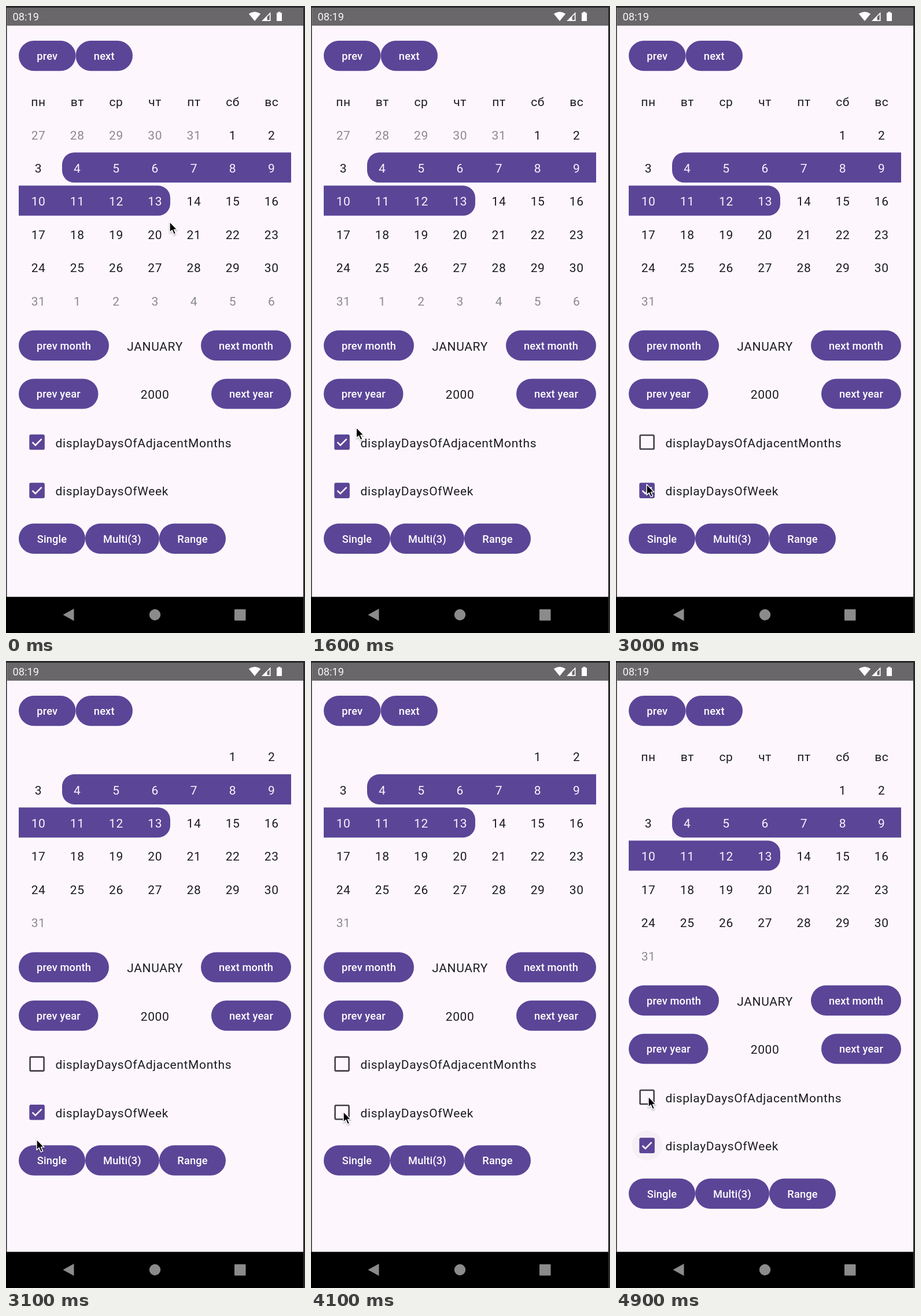
Recreate the animation shown at these times as an HTML page. Size 517 by 1084 pixels, loop 5 s.

```html
<!DOCTYPE html>
<html lang="en">
<head>
<meta charset="utf-8">
<title>Calendar range selection</title>
<style>
  html, body { margin: 0; width: 100%; height: 100%; overflow: hidden; background: #fdf7fd; }
  svg { display: block; width: 517px; height: 1084px; }
  text { font: 400 21px Roboto, "Open Sans", sans-serif; letter-spacing: .65px; fill: #1c1b1f; }
  .mid { text-anchor: middle; }
  .dim { fill: #8d898e; }
  .on { fill: #f8f4fc; }
  .label { font-size: 18.3px; font-weight: 500; letter-spacing: .13px; fill: #fff; }
  .clock { font-size: 18.3px; letter-spacing: 0; fill: #f6f6f6; }
  .fill { fill: #5b4597; }
</style>
</head>
<body>
<svg viewBox="0 0 517 1084">
  <defs>
    <radialGradient id="glow">
      <stop offset=".5" stop-color="#1c1b1f" stop-opacity=".3"/>
      <stop offset="1" stop-color="#1c1b1f" stop-opacity="0"/>
    </radialGradient>
    <filter id="shade" x="-50%" y="-50%" width="200%" height="200%">
      <feDropShadow dx="0" dy="1.5" stdDeviation="1.2" flood-opacity=".35"/>
    </filter>
  </defs>
  <rect width="517" height="1084" fill="#2a282b"/>
  <rect x="1.5" y="3" width="512.5" height="1081" fill="#fdf7fd"/>
  <rect x="1.5" y="3" width="512.5" height="31" fill="#6a676a"/>
  <text class="clock" x="11.5" y="25">08:19</text>
  <g fill="#fff">
    <path d="M419.800 13.500Q430 6.500 440.200 13.500L430 26Z"/>
    <path d="M457.500 10.500V26H442ZM455.800 14.500L451.500 18.800V24.300H455.800Z" fill-rule="evenodd"/>
    <path d="M470.500 10H474.500V11.800H477V26H468V11.800H470.500Z"/>
  </g>

  <g id="top"></g>
  <g id="week"></g>
  <g id="body">
    <path class="fill" d="M493 253.200V305.300H118A21 21 0 0 1 97 284.300V274.200A21 21 0 0 1 118 253.200Z"/>
    <path class="fill" d="M22 310.600H263A21 21 0 0 1 284 331.600V341.600A21 21 0 0 1 263 362.600H22Z"/>
    <g id="adjacent"></g>
    <g id="days"></g>
  </g>

  <rect y="1021.500" width="514" height="62.500"/>
  <g fill="#8b8b8b">
    <path d="M98.500 1052.500L117.500 1042V1063Z"/>
    <circle cx="257.500" cy="1052.500" r="9.700"/>
    <rect x="395" y="1043" width="19.500" height="19.500" rx="1"/>
  </g>
  <path id="cursor" filter="url(#shade)" fill="#000" stroke="#fff" stroke-width="1.400" stroke-linejoin="round"
        d="M0 0V18.500L4.200 14.600L7.300 21.800L10.600 20.400L7.500 13.400H13Z"/>
</svg>
<script>
const $ = id => document.getElementById(id);
const LOOP = 5000, STEP = 100, ROW = 57.4;
const HIDE_ADJACENT = 2000, HIDE_WEEK = 3100, SHOW_WEEK = 4200;

function add(parent, tag, attrs, content) {
  const el = document.createElementNS("http://www.w3.org/2000/svg", tag);
  for (const key in attrs) el.setAttribute(key, attrs[key]);
  if (content) el.textContent = content;
  parent.appendChild(el);
  return el;
}

function button(parent, left, right, top, content) {
  add(parent, "rect", { class: "fill", x: left, y: top, width: right - left, height: 52.2, rx: 26.1 });
  add(parent, "text", { class: "mid label", x: (left + right) / 2, y: top + 33 }, content);
}

function cell(parent, col, row, content, cls = "") {
  add(parent, "text", { class: "mid " + cls, x: 56.1 + 67.2 * col, y: 173.2 + ROW * row }, content);
}

function checkbox(y, content) {
  const g = add($("body"), "g", { transform: `translate(53.6 ${y})` });
  const ripple = add(g, "circle", { r: 26.1 });
  const box = add(g, "rect", { x: -12, y: -12, width: 24, height: 24, rx: 1.6, "stroke-width": 2.6 });
  const tick = add(g, "path", { d: "M-8 .2L-2.800 5.400L8 -5.400", fill: "none", stroke: "#fff", "stroke-width": 2.5 });
  add(g, "text", { x: 31.8, y: 8.5 }, content);
  return { ripple, box, tick };
}

function drawCheckbox(part, checked, age) {
  const early = age >= 100 && age < 200;
  part.box.setAttribute("fill", checked ? "#5b4597" : early ? "rgba(28,27,31,.07)" : "none");
  part.box.setAttribute("stroke", checked ? "#5b4597" : "#443f49");
  part.tick.style.display = checked ? "" : "none";
  part.ripple.setAttribute("fill", early ? "url(#glow)" : "#1c1b1f");
  part.ripple.setAttribute("r", early ? 23 : 26.1);
  part.ripple.setAttribute("opacity", early ? 1 : age >= 200 ? Math.max(0, .12 * (900 - age) / 800) : 0);
}

button($("top"), 22, 120.5, 60, "prev");
button($("top"), 120.5, 219, 60, "next");
["пн", "вт", "ср", "чт", "пт", "сб", "вс"].forEach((name, i) => cell($("week"), i, 0, name));

// The grid begins on 27 December
for (let i = 0; i < 42; i++) {
  const day = i - 4, col = i % 7, row = 1 + Math.floor(i / 7);
  if (day < 1) cell($("adjacent"), col, row, day + 31, "dim");
  else if (day > 31) cell($("adjacent"), col, row, day - 31, "dim");
  else cell($("days"), col, row, day, day === 31 ? "dim" : day > 3 && day < 14 ? "on" : "");
}

const body = $("body");
button(body, 22, 178, 560.8, "prev month");
button(body, 337, 493, 560.8, "next month");
button(body, 22, 159.5, 644.4, "prev year");
button(body, 355, 493, 644.4, "next year");
add(body, "text", { class: "mid", x: 257.6, y: 595.5 }, "JANUARY");
add(body, "text", { class: "mid", x: 257.6, y: 679 }, "2000");
const adjacentBox = checkbox(754, "displayDaysOfAdjacentMonths");
const weekBox = checkbox(837.6, "displayDaysOfWeek");
button(body, 22, 137, 894.7, "Single");
button(body, 137, 265, 894.7, "Multi(3)");
button(body, 265, 380, 894.7, "Range");

// Pointer stops: time, x, y
const path = [
  [0, 283, 373], [100, 283, 373], [300, 205, 312], [500, 100, 268], [600, 97, 265],
  [800, 101, 530], [1000, 106, 680], [1300, 106, 683], [1800, 60, 759], [2500, 60, 759],
  [2900, 53, 827], [3300, 53, 827], [3800, 56, 779], [4400, 56, 779], [4800, 56, 753], [5000, 56, 753]
];

function pointerAt(t) {
  const i = path.findIndex(p => p[0] > t);
  const [t0, x0, y0] = path[i - 1], [t1, x1, y1] = path[i];
  const k = (t - t0) / (t1 - t0);
  return [x0 + (x1 - x0) * k, y0 + (y1 - y0) * k];
}

function draw(t) {
  const compact = t >= HIDE_WEEK && t < SHOW_WEEK;
  $("week").style.display = compact ? "none" : "";
  body.setAttribute("transform", `translate(0 ${compact ? -ROW : 0})`);
  $("adjacent").style.display = t < HIDE_ADJACENT ? "" : "none";
  // Each box repaints one step after its layout change
  drawCheckbox(adjacentBox, t < HIDE_ADJACENT + STEP, t - HIDE_ADJACENT);
  drawCheckbox(weekBox, t < HIDE_WEEK + STEP || t >= SHOW_WEEK + STEP,
    t - (t < SHOW_WEEK ? HIDE_WEEK : SHOW_WEEK));
  $("cursor").setAttribute("transform", `translate(${pointerAt(t)})`);
}

const start = performance.now();
function tick() {
  const t = (performance.now() - start) % LOOP;
  draw(Math.floor(t / STEP) * STEP);
  requestAnimationFrame(tick);
}
tick();
</script>
</body>
</html>
```
